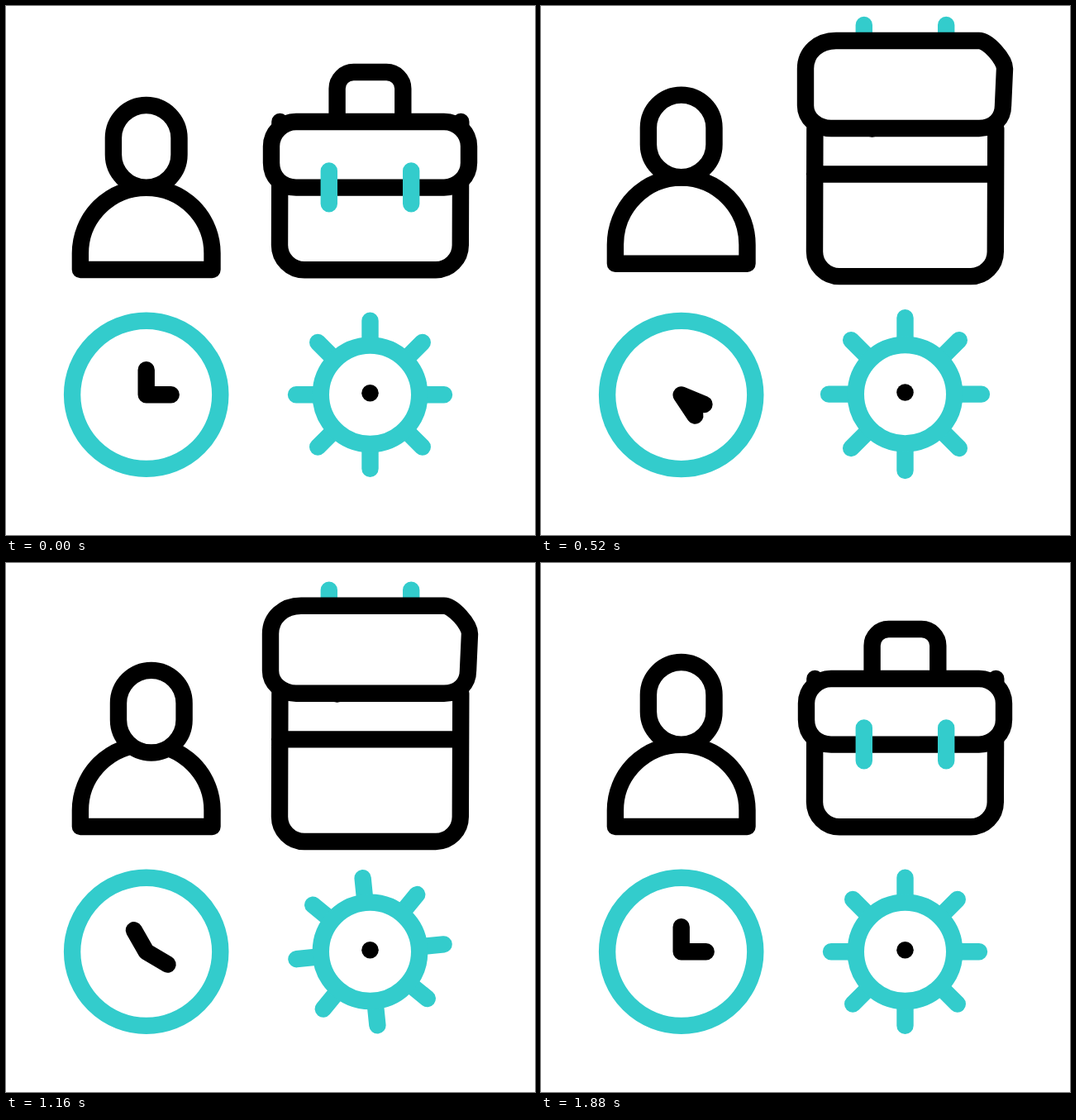
An HTML page for the animation above (2 s loop, 640 by 640 pixels).

```html
<!DOCTYPE html>
<html lang="en">
<head>
<meta charset="utf-8">
<title>Work icons</title>
<style>
  html, body { margin: 0; width: 100%; height: 100%; overflow: hidden; background: #fff; }
  svg { display: block; width: 100vw; height: 100vh; }
  .ink, .teal { fill: none; stroke: #000; stroke-width: 20.4; stroke-linecap: round; stroke-linejoin: round; }
  .teal { stroke: #3cc; }
  .solid { fill: #fff; }
</style>
</head>
<body>
<svg viewBox="0 0 640 640">
  <path id="torso" class="ink"/>
  <rect id="head" class="ink solid" x="129.9" y="120" width="79.6" height="99.6" rx="39.8"/>

  <g id="bag">
    <path class="ink" d="M331.4 140L331 289.2A30 30 0 0 0 361 319.2H520A30 30 0 0 0 549.8 289.2L550.3 140M331 195.6H550"/>
    <path class="ink" d="M400.6 140.7V100A20 20 0 0 1 420.6 80H460.3A20 20 0 0 1 480.3 100V139"/>
    <path id="strapsBack" class="teal"/>
    <path id="lid" class="ink solid"/>
    <path id="strapsFront" class="teal"/>
  </g>

  <g id="clock">
    <circle class="teal" cx="169.7" cy="470.3" r="89.6"/>
    <path id="hands" class="ink"/>
  </g>

  <g id="gear">
    <path id="spokes" class="teal"/>
    <circle class="teal" cx="440.5" cy="470.3" r="59.7"/>
    <circle cx="440.5" cy="468.2" r="10.3"/>
  </g>
</svg>
<script>
const LOOP = 2000, STEP = 40;
const el = Object.fromEntries([...document.querySelectorAll('[id]')].map(e => [e.id, e]));

// Smooth monotone curve through [time, value] keys, flat at both ends.
function track(...keys) {
  const slope = i => (keys[i + 1][1] - keys[i][1]) / (keys[i + 1][0] - keys[i][0]);
  const tangent = keys.map((k, i) => {
    if (i === 0 || i === keys.length - 1) return 0;
    const a = slope(i - 1), b = slope(i);
    return a * b > 0 ? 2 * a * b / (a + b) : 0;
  });
  return t => {
    if (t <= keys[0][0]) return keys[0][1];
    const i = keys.findIndex(k => k[0] >= t) - 1;
    if (i < 0) return keys[keys.length - 1][1];
    const [t0, v0] = keys[i], [t1, v1] = keys[i + 1];
    const w = t1 - t0, u = (t - t0) / w, u2 = u * u, u3 = u2 * u;
    return v0 + (v1 - v0) * (3 * u2 - 2 * u3)
      + w * (tangent[i] * (u3 - 2 * u2 + u) + tangent[i + 1] * (u3 - u2));
  };
}

const CLOSED = 79.6, OPEN = -106;
const closing = [[1220, OPEN], [1560, 22], [1760, CLOSED]];

const hop      = track([80, 0], [360, -40], [400, -37.6], [640, 7.4], [780, 0]);
const feet     = track([120, 0], [360, -36], [400, -33.3], [580, 0]);
const lean     = track([880, 0], [1340, 1], [1480, 1], [1840, 0]);
const bagY     = track([80, 0], [360, -10], [400, -9.5], [640, 24], [780, 17.8], [1500, 17.8], [1780, 0]);
const flap     = track([80, CLOSED], [400, OPEN], ...closing);
const buckle   = track([80, CLOSED], [400, -99], [480, OPEN], ...closing);
const clockY   = track([80, 0], [320, 26], [400, 20], [640, -13.7], [780, 0]);
const handTurn = track([80, 0], [1840, 360]);
const gearY    = track([80, 0], [360, -11], [400, -10], [640, 6.5], [780, 0]);
const spokeLen = track([80, 89.5], [400, 101.5], [640, 83.3], [780, 89.5]);
const gearTurn = track([720, 0], [880, 20.5], [1160, 129.3], [1560, 310.3], [1840, 360]);

const mix = (a, b, p) => a + (b - a) * p;
const move = (node, x, y) => node.setAttribute('transform', `translate(${x} ${y})`);
const draw = (node, d) => node.setAttribute('d', d);

// Point at a clock angle in degrees, as path text.
function polar(cx, cy, r, deg) {
  const a = deg * Math.PI / 180;
  return `${cx + r * Math.sin(a)} ${cy - r * Math.cos(a)}`;
}

function torsoPath(top, bottom) {
  const side = bottom - 20 - 0.6 * (bottom - top - 99.4);
  return `M89.9 ${bottom}V${side}A79.8 ${side - top} 0 0 1 249.5 ${side}V${bottom}Z`;
}

// Rounded flap hinged at y 140; d is the signed offset of its free edge.
function lidPath(d) {
  const p = (CLOSED - d) / (CLOSED - OPEN);
  const y = k => 140 + d * k;
  const left = mix(321, 320, p);
  const nearR = mix(560, 559, p), farR = mix(560, 561, p);
  const near = mix(0.375, 0.26, p), far = 1 - mix(0.375, 0.32, p);
  const farL = mix(351, 357, p);
  const soft = mix(0.45, 0.66, p);
  return `M351 ${y(0)}H530
    C${mix(546.5, 548, p)} ${y(0)} ${nearR} ${y(near * 0.45)} ${nearR} ${y(near)}
    L${farR} ${y(far)}
    C${farR} ${y(mix(far, 1, 1 - soft))} ${mix(farR, 530, soft)} ${y(1)} 530 ${y(1)}
    H${farL}
    C${mix(left, farL, 0.42)} ${y(1)} ${left} ${y(mix(1, far, 0.42))} ${left} ${y(far)}
    V${y(near)}
    C${left} ${y(near * 0.45)} ${left + 13.5} ${y(0)} 351 ${y(0)}Z`;
}

function strapsPath(d) {
  const edge = d < 22
    ? [mix(55, 151.3, (d - OPEN) / (22 - OPEN)), mix(15, 151.3, (d - OPEN) / (22 - OPEN))]
    : [mix(151.3, 199.5, (d - 22) / (CLOSED - 22)), mix(151.3, 239.3, (d - 22) / (CLOSED - 22))];
  return [390.8, 490.2].map(x => `M${x} ${edge[0]}L${x} ${edge[1] + 0.01}`).join('');
}

function render(t) {
  const up = hop(t), nod = lean(t);
  move(el.head, 9.2 * nod, up + 15 * nod);
  draw(el.torso, torsoPath(219.8 + up, 319 + feet(t)));

  const d = flap(t), straps = strapsPath(buckle(t));
  move(el.bag, 0, bagY(t));
  draw(el.lid, lidPath(d));
  draw(el.strapsFront, d > 0 ? straps : '');
  draw(el.strapsBack, d > 0 ? '' : straps);

  const turn = handTurn(t);
  move(el.clock, 0, clockY(t));
  draw(el.hands, `M${polar(169.7, 470.3, 30, 2 * turn)}L169.7 470.3L${polar(169.7, 470.3, 30, 90 + turn)}`);

  let spokes = '';
  for (let a = gearTurn(t), i = 0; i < 8; i++, a += 45)
    spokes += `M${polar(440.5, 470.3, 62, a)}L${polar(440.5, 470.3, spokeLen(t), a)}`;
  move(el.gear, 0, gearY(t));
  draw(el.spokes, spokes);
}

function tick() {
  const t = performance.now() % LOOP;
  render(Math.floor(t / STEP) * STEP);
  requestAnimationFrame(tick);
}
tick();
</script>
</body>
</html>
```
